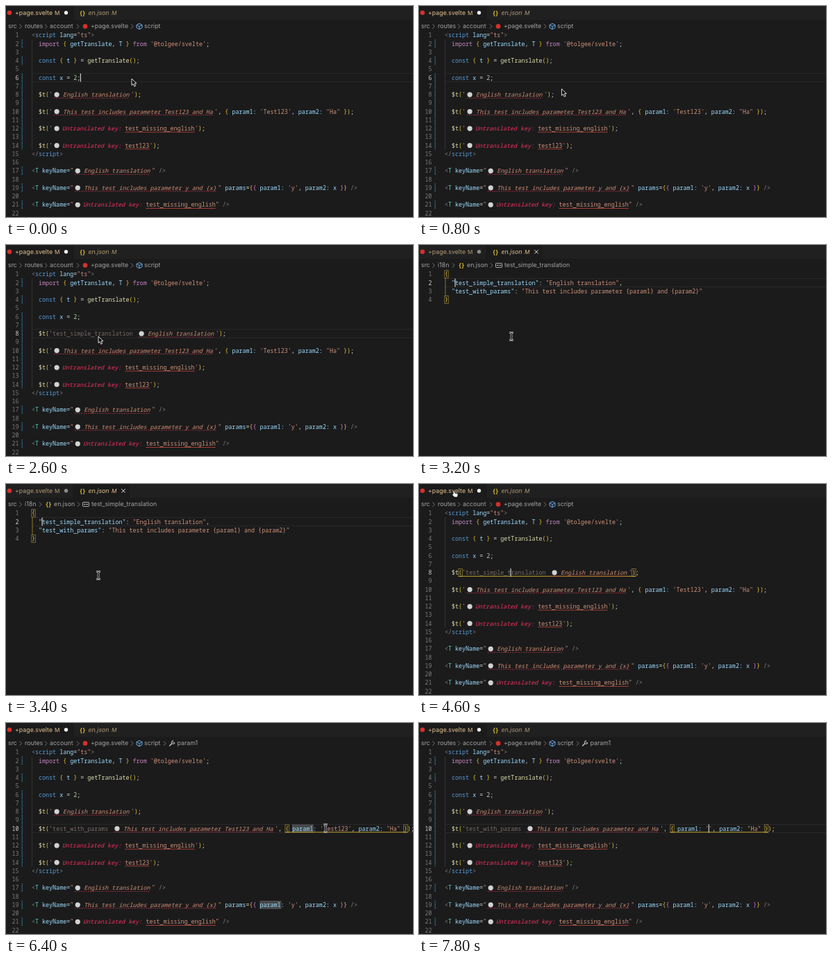
Write an HTML page that moves like this. It is 586 by 305 pixels and loops after 8 s.

```html
<!DOCTYPE html>
<html lang="en">
<head>
<meta charset="utf-8">
<title>Editor</title>
<style>
html, body { margin: 0; width: 100%; height: 100%; overflow: hidden; background: #1b1b1c; }
svg { display: block; width: 100vw; height: 100vh; }
text { white-space: pre; }
.code { font: 500 8.37px "Noto Sans Mono", "DejaVu Sans Mono", monospace; font-variant-ligatures: none; }
.ui { font: 8.8px Inter, "Open Sans", sans-serif; }
.italic { font-style: italic; }
.small { font-size: 8.2px; }
</style>
</head>
<body>
<svg id="stage" viewBox="0 0 586 305"></svg>
<script>
const stage = document.getElementById('stage');
const LOOP = 8000, STEP = 200;
const CW = 5.02, LEFT = 37, LINE = 12.25;
const ICON = 15, KEY_GAP = 6.5, TAIL = 2.3;
const GOLD = '#e6c32e';
const COLORS = {
  p: '#c586c0', k: '#569cd6', v: '#9cdcfe', f: '#dcdcaa', s: '#ce9178', w: '#d4d4d4',
  g: GOLD, o: '#da70d6', n: '#b5cea8', c: '#4ec9b0', x: '#808080', h: '#786a62',
  t: '#d38f74', u: '#f0325f', m: '#ce9178'
};

const esc = s => s.replace(/&/g, '&amp;').replace(/</g, '&lt;');
const midY = n => 42.3 + LINE * (n - 1);
const text = (cls, x, y, s, fill, extra = '') =>
  `<text class="${cls}" x="${x.toFixed(2)}" y="${(y + 3).toFixed(2)}" fill="${fill}" ${extra}>${esc(s)}</text>`;
const ui = (x, y, s, fill, cls = '') => text('ui ' + cls, x, y, s, fill);
const rect = (x, y, w, h, fill, extra = '') =>
  `<rect x="${x}" y="${y}" width="${w}" height="${h}" fill="${fill}" ${extra}/>`;
const dot = (x, y, r, fill) => `<circle cx="${x}" cy="${y}" r="${r}" fill="${fill}"/>`;
const path = (d, stroke, w = 0.9, extra = '') =>
  `<path d="${d}" fill="none" stroke="${stroke}" stroke-width="${w}" ${extra}/>`;

// Each token is one colour letter followed by its text; tokens are split by "|".
function codeLine(n, src) {
  const y = midY(n);
  let x = LEFT, out = '', afterKey = false;
  for (const token of src.split('|')) {
    const kind = token[0], s = token.slice(1), w = s.length * CW;
    const hint = kind === 't' || kind === 'u';
    if (hint) {
      if (afterKey) x += KEY_GAP;
      out += dot(x + 6, y, 3.6, '#d2d2d2');
      const from = x + 1.5;
      x += kind === 't' ? ICON : ICON - 1.2;
      if (kind === 't') out += path(`M${from} ${y + 5}H${x + w}`, '#b8364a', 0.8, 'stroke-dasharray="2 1.2"');
    }
    if (kind === 'm') out += path(`M${x} ${y + 5.2}h${w}`, '#c4483c', 0.8);
    out += text(hint ? 'code italic' : 'code', x, y, s, COLORS[kind]);
    x += w + (kind === 't' ? TAIL : 0);
    afterKey = kind === 'h';
  }
  return out;
}

const gutter = (count, active) => {
  let out = '';
  for (let n = 1; n <= count; n++)
    out += text('code', 18.5, midY(n), String(n), n === active ? '#d0d0d0' : '#7c7c7c', 'text-anchor="end"');
  return out;
};
const changeBars = () => [[2, 2], [4, 4], [6, 14], [17, 17], [19, 19], [21, 21]].map(([a, b]) =>
  path(`M23.3 ${midY(a) - 6}V${midY(b) + 6}`, '#2a7a9a', 1.5, 'stroke-dasharray="1.2 .9"')).join('');

const currentLine = n =>
  path(`M${LEFT} ${midY(n) - 6}H586M${LEFT} ${midY(n) + 6}H586`, '#2b2b2c', 0.9);
const caret = (x, n) => rect(x - 0.5, midY(n) - 6, 1.1, 12, '#dcdcdc');
const bracketBox = (x, n) =>
  rect(x - 0.2, midY(n) - 5.6, CW + 0.4, 11.2, 'none', 'stroke="#8a7a3a" stroke-width=".8"');
const bracketPair = (a, b, n) =>
  bracketBox(a, n) + bracketBox(b, n) + path(`M${a} ${midY(n) + 5.3}H${b + CW}`, GOLD, 0.8);

const chevron = x => path(`M${x - 1.5} 26.3l3 3.2l-3 3.2`, '#8a8a8a', 0.8);
const braces = (x, y) => text('code', x, y, '{}', GOLD, 'style="font-weight:700;letter-spacing:-.8px"');
const cube = (x, y) =>
  path(`M${x} ${y - 4}l4 2v4l-4 2.4l-4 -2.4v-4zM${x - 4} ${y - 2}l4 2.2l4 -2.2M${x} ${y + 0.2}v4`, '#75beff', 0.9);
const wrench = (x, y) =>
  path(`M${x - 3.8} ${y + 3.8}l4 -4`, '#c5c5c5', 1.5) +
  path(`M${x + 1.6} ${y - 3.8}a2.4 2.4 0 1 0 2.4 2.8l-1.8 .6l-1.2 -1.3z`, '#c5c5c5', 0.9);
const field = (x, y) =>
  rect(x - 4.5, y - 3, 9, 6, 'none', 'rx=".8" stroke="#c5c5c5" stroke-width=".9"') +
  path(`M${x - 2.7} ${y}h2.2M${x + 0.7} ${y}h2.2`, '#c5c5c5', 1.4);

function tabs(json) {
  const dim = '#b29a74', lit = '#e2c08d', y = 9.8;
  const page = json ? dim : lit, data = json ? lit : dim;
  return rect(0, 0, 586, 20, '#202021') +
    rect(json ? 97 : 0, 0, json ? 81 : 96.5, 20, '#1b1b1c') +
    rect(96.5, 0, 0.7, 20, '#18181a') +
    dot(5, y, 3.3, '#d5302a') +
    ui(13, y, '+page.svelte', page) + ui(70, y, 'M', page, 'small') +
    dot(86.5, y, 2.7, json ? '#8c8c8c' : '#ededed') +
    braces(105.5, y) +
    ui(118.5, y, 'en.json', data, 'italic') + ui(152, y, 'M', data, 'italic small') +
    (json ? path('M166.3 7.1l5.4 5.4m0 -5.4l-5.4 5.4', '#e0e0e0', 1) : '');
}

function breadcrumbs(json, param) {
  const c = '#a3a3a3', y = 29.4;
  let out = ui(3, y, 'src', c) + chevron(21);
  if (json)
    return out + ui(27, y, 'i18n', c) + chevron(49.5) + braces(56.5, y) + ui(69, y, 'en.json', c) +
      chevron(104.5) + field(115, y) + ui(123, y, 'test_simple_translation', c);
  out += ui(27, y, 'routes', c) + chevron(57.5) + ui(63, y, 'account', c) + chevron(103.5) +
    dot(114, y, 3.3, '#d5302a') + ui(122, y, '+page.svelte', c) + chevron(181.5) +
    cube(192, y) + ui(199, y, 'script', c);
  return param ? out + chevron(228.5) + wrench(239, y) + ui(246.5, y, 'param1', c) : out;
}

const phraseFor = value => `This test includes parameter ${value && value + ' '}and Ha`;
const braceX = value => LEFT + CW * (25 + phraseFor(value).length) + KEY_GAP + ICON + TAIL;
const quoteX = value => braceX(value) + CW * 11;

function paramLine(s) {
  const brace = braceX(s.value), quote = quoteX(s.value);
  const mark = (x, n) => rect(x, midY(n) - 5.5, CW * 6, 11, '#46484a', 'stroke="#666" stroke-width=".5"');
  return (s.mark ? mark(brace + CW * 2, 10) + mark(LEFT + CW * 65.5, 19) : '') +
    (s.select ? rect(quote, midY(10) - 6, CW * s.select, 12, '#264f78') : '') +
    bracketPair(brace, brace + CW * (27 + s.value.length), 10) +
    (s.caret ? caret(quote + CW * s.select, 10) : '');
}

function pageView(s) {
  const key8 = s.line === 8 ? 'htest_simple_translation|' : '';
  const key10 = s.line === 10 ? 'htest_with_params|' : '';
  let out = path(`M37.5 ${midY(2) - 6}V${midY(14) + 6}`, '#3a3a3a', 0.8);
  if (!s.fresh) out += currentLine(s.line) + changeBars();
  if (s.line === 10) out += paramLine(s);
  if (s.pair) out += bracketPair(LEFT + CW * 4, LEFT + CW * 49 + KEY_GAP + ICON + TAIL, 8);

  const rows = {
    1: 'x<|kscript |vlang|w=|s"ts"|x>',
    2: 'w  |pimport |g{ |vgetTranslate|w, |vT |g} |pfrom |s\'@tolgee/svelte\'|w;',
    4: 'w  |kconst |g{ |vt |g} |w= |fgetTranslate|g()|w;',
    6: 'w  |kconst |vx |w= |n2|w;',
    8: `w  |f$t|g(|s'|${key8}tEnglish translation|s'|g)|w;`,
    10: `w  |f$t|g(|s'|${key10}t${phraseFor(s.value)}|s'|w, |g{ |vparam1: |s'${s.value}'|w, |vparam2: |s"Ha" |g}|g)|w;`,
    12: 'w  |f$t|g(|s\'|uUntranslated key: |mtest_missing_english|s\'|g)|w;',
    14: 'w  |f$t|g(|s\'|uUntranslated key: |mtest123|s\'|g)|w;',
    15: 'x</|kscript|x>',
    17: 'x<|cT |vkeyName|w=|s"|tEnglish translation|s" |x/>',
    19: 'x<|cT |vkeyName|w=|s"|tThis test includes parameter y and {x}|s" |vparams|w=|g{|o{ |vparam1: |s\'y\'|w, |vparam2: |vx |o}|g} |x/>',
    21: 'x<|cT |vkeyName|w=|s"|uUntranslated key: |mtest_missing_english|s" |x/>'
  };
  for (const n in rows) out += codeLine(+n, rows[n]);
  if (s.line !== 10 && s.caret) out += caret(s.caretX, s.line);
  return out + gutter(22, s.line);
}

function jsonView(s) {
  return currentLine(2) + path(`M38 ${midY(1) + 5}V${midY(4) - 5}`, '#a98f2a', 0.8) +
    bracketBox(LEFT, 1) + bracketBox(LEFT, 4) +
    codeLine(1, 'g{') +
    codeLine(2, 'w  |v"test_simple_translation"|w: |s"English translation"|w,') +
    codeLine(3, 'w  |v"test_with_params"|w: |s"This test includes parameter {param1} and {param2}"') +
    codeLine(4, 'g}') +
    (s.caret ? caret(52, 2) : '') + gutter(4, 2);
}

// Pointer stops: time, x, y
const STOPS = [
  [0, 181, 105], [400, 181, 105], [1000, 214, 125], [1600, 226, 125], [1800, 226, 125],
  [2400, 133, 132], [3600, 133, 132], [4200, 50, 9], [4800, 50, 9], [5600, 340, 152],
  [5800, 340, 152], [6400, 460, 152], [6600, 460, 152], [7000, 491, 152], [8000, 491, 152]
];
function pointerAt(t) {
  const i = STOPS.findIndex(p => p[0] > t);
  const [t0, x0, y0] = STOPS[i - 1], [t1, x1, y1] = STOPS[i];
  const u = (t - t0) / (t1 - t0), e = u * u * (3 - 2 * u);
  return [x0 + (x1 - x0) * e, y0 + (y1 - y0) * e];
}

const ARROW = '<path d="M0 0v9.6l2.2 -2l1.6 3.7l1.8 -.8l-1.6 -3.6h3z" fill="#0a0a0a" stroke="#f2f2f2" stroke-width=".9"/>';
const HAND = '<path d="M-1 1q1 -1.2 2 0l1 3l3.2 .8q1.2 .4 .9 1.8l-.8 3.4h-4.6l-3 -3.6q-.2 -1.3 1.5 -.8z" fill="#f2f2f2" stroke="#111" stroke-width=".7"/>';
const BEAM_PATH = 'M-2.8 -5.5q2.8 0 2.8 1.7v7.6q0 1.7 -2.8 1.7M2.8 -5.5q-2.8 0 -2.8 1.7v7.6q0 1.7 2.8 1.7M-1.6 0h3.2';
const BEAM = path(BEAM_PATH, '#e6e6e6', 2.5) + path(BEAM_PATH, '#141414', 0.9);

function pointer(t) {
  if (t >= 7400) return '';
  const [x, y] = pointerAt(t);
  const beam = (t >= 3000 && t < 3800) || t >= 5800;
  const shape = beam ? BEAM : y < 20 ? HAND : ARROW;
  return `<g transform="translate(${x.toFixed(1)} ${y.toFixed(1)})">${shape}</g>`;
}

// Editor states, each valid from its start time
const STATES = [
  { at: 0, line: 6, caretX: 107.3 },
  { at: 1000, line: 8, caretX: 317 },
  { at: 2800, line: 8, caretX: 132, pair: true },
  { at: 3000, json: true },
  { at: 4400, line: 8, caretX: 132, pair: true, fresh: true },
  { at: 5000, line: 8, caretX: 132, pair: true },
  { at: 5800, line: 10, mark: true },
  { at: 6600, line: 10 },
  { at: 7400, line: 10, value: '' }
];
function stateAt(t) {
  const s = { value: 'Test123', select: 0, ...STATES.filter(v => v.at <= t).pop() };
  if (t >= 6600 && s.value) {
    const chars = Math.round((pointerAt(t)[0] - quoteX(s.value)) / CW);
    s.select = Math.max(0, Math.min(s.value.length, chars));
  }
  s.caret = (t - s.at) % 1000 < 500 && !s.mark;
  return s;
}

function draw(t) {
  const s = stateAt(t);
  stage.innerHTML = rect(0, 0, 586, 305, '#1b1b1c') + tabs(s.json) +
    breadcrumbs(s.json, s.line === 10) + (s.json ? jsonView(s) : pageView(s)) + pointer(t);
}

let shown = -1;
function tick(now) {
  const t = Math.floor((now % LOOP) / STEP) * STEP;
  if (t !== shown) draw(shown = t);
  requestAnimationFrame(tick);
}
draw(0);
requestAnimationFrame(tick);
</script>
</body>
</html>
```
